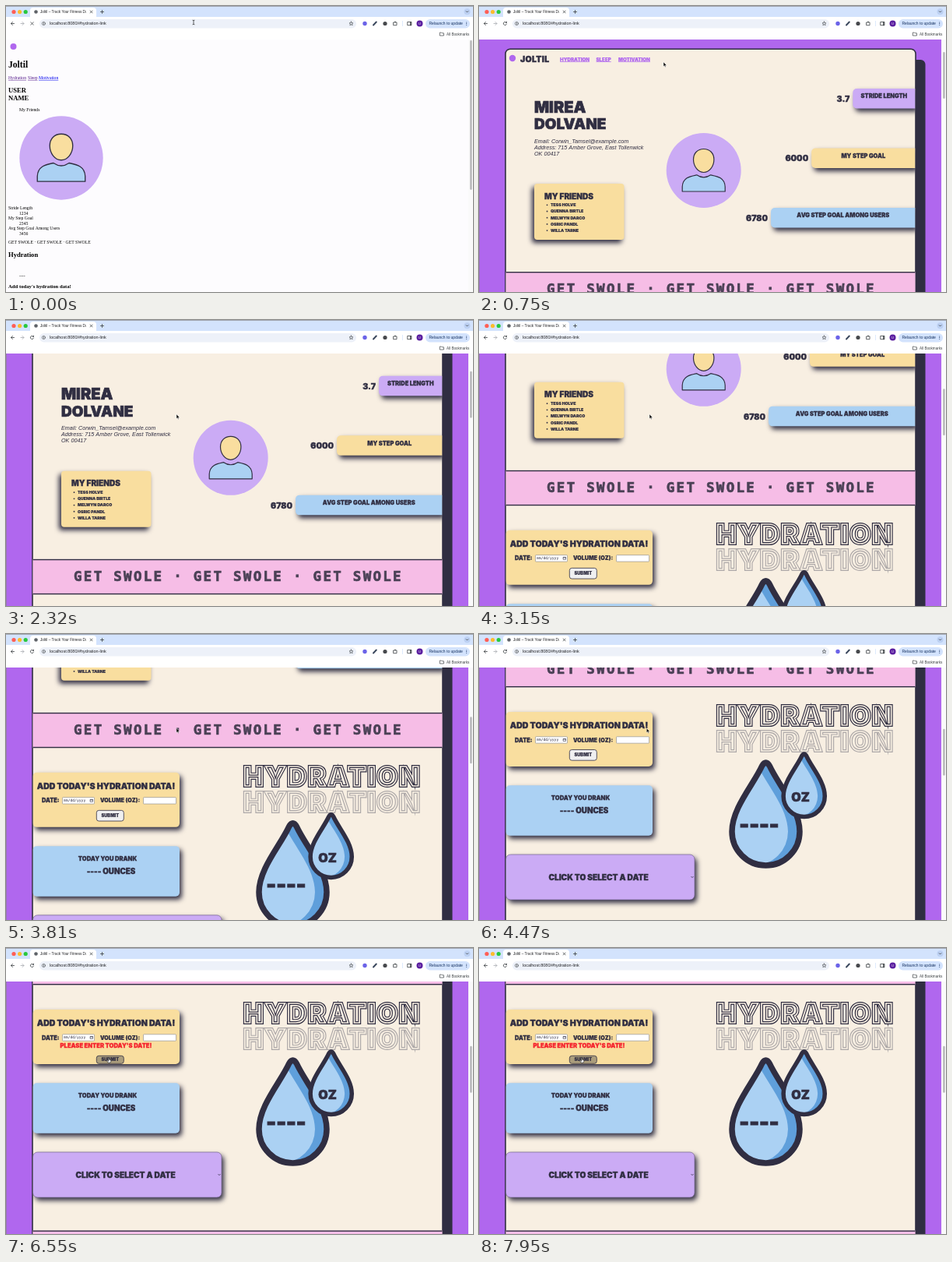
An HTML page with a canvas that plays this animation: 600x367 px, repeating every 8000 ms.

```html
<!DOCTYPE html>
<html lang="en">
<head>
<meta charset="utf-8">
<title>Joltil</title>
<style>
  html, body { margin: 0; width: 100%; height: 100%; overflow: hidden; }
  canvas { display: block; width: 600px; height: 367px; }
</style>
</head>
<body>
<canvas id="stage" width="600" height="367"></canvas>
<script>
const LOOP = 8000, STYLED_AT = 160, HOVER_AT = 6050, ERROR_AT = 6500;
const INK = '#302e42', CREAM = '#f8efe2', PURPLE = '#b067ee', LILAC = '#cbabf5',
      YELLOW = '#f9de9f', BLUE = '#abd1f3', DEEP = '#5f9fdb', PINK = '#f6bde6';
const SANS = '"Liberation Sans", Arial, sans-serif', SERIF = '"Liberation Serif", Times, serif',
      HEAVY = 'Inter, sans-serif', MONO = '"DejaVu Sans Mono", monospace';

const g = document.getElementById('stage').getContext('2d');

// Text placed by the middle of its capitals; weight thickens the letters, in em.
function text(str, x, y, size, { face = HEAVY, style = '900', color = INK, align = 'left',
                                 spacing = 0, line, weight = face === HEAVY ? 0.035 : 0 } = {}) {
  g.font = `${style} ${size}px ${face}`;
  g.textAlign = align;
  g.letterSpacing = spacing + 'px';
  g.fillStyle = g.strokeStyle = color;
  const base = y + size * 0.355;
  g.fillText(str, x, base);
  if (weight) {
    g.lineWidth = size * weight;
    g.lineJoin = 'miter';
    g.strokeText(str, x, base);
  }
  if (line) g.fillRect(x, y + size * 0.46, g.measureText(str).width, line);
}

function rect(x, y, w, h, color) {
  g.fillStyle = color;
  g.fillRect(x, y, w, h);
}

function box(x, y, w, h, r, color, { border, width = 0.8, shadow } = {}) {
  g.save();
  g.beginPath();
  g.roundRect(x, y, w, h, r);
  g.fillStyle = color;
  if (shadow) {
    g.shadowColor = INK;
    g.shadowBlur = 6.5;
    g.shadowOffsetX = shadow;
    g.shadowOffsetY = 4;
  }
  g.fill();
  g.restore();
  if (border) {
    g.strokeStyle = border;
    g.lineWidth = width;
    g.stroke();
  }
}

function disc(x, y, r, color) {
  g.beginPath();
  g.arc(x, y, r, 0, 7);
  g.fillStyle = color;
  g.fill();
}

function stroke(d, x, y, color = '#3c4043', width = 0.8, fill) {
  g.save();
  g.translate(x, y);
  const path = new Path2D(d);
  if (fill) {
    g.fillStyle = fill;
    g.fill(path);
  }
  g.strokeStyle = color;
  g.lineWidth = width;
  g.lineJoin = g.lineCap = 'round';
  g.stroke(path);
  g.restore();
}

// Interpolation through [time, ...values]; ease shapes each segment.
function track(keys, t, ease = p => p) {
  const i = keys.findIndex(k => k[0] > t);
  if (i < 0) return keys[keys.length - 1].slice(1);
  if (i === 0) return keys[0].slice(1);
  const a = keys[i - 1], b = keys[i], p = ease((t - a[0]) / (b[0] - a[0]));
  return a.slice(1).map((v, j) => v + (b[j + 1] - v) * p);
}
const smooth = p => p * p * (3 - 2 * p);

const SCROLL = [[2070, 0], [2320, 34], [2730, 98], [2880, 98], [3150, 148], [3310, 172],
                [3450, 172], [3810, 240], [4230, 305], [4360, 305], [4650, 339]];
const POINTER = [[80, 241, 21], [600, 237, 72], [1000, 237, 72], [1750, 219, 121],
                 [4400, 219, 121], [5050, 107, 121], [5400, 107, 121], [6200, 132, 141]];

function browser(t) {
  rect(0, 0, 600, 14, '#d3e3fd');
  rect(0, 14, 600, 29, '#fff');
  rect(0, 0, 600, 0.7, '#8b8b90');
  ['#ff5f57', '#febc2e', '#28c840'].forEach((c, i) => disc(10 + 7.6 * i, 7.5, 2.6, c));
  box(31, 2, 85, 13, [4, 4, 0, 0], '#fff');
  disc(38.5, 7.5, 2.3, '#5f6368');
  g.save();
  g.beginPath();
  g.rect(44, 0, 59, 14);
  g.clip();
  text('Joltil – Track Your Fitness Da', 44, 7.5, 4.7, { face: SANS, style: '', color: '#202124' });
  g.restore();
  stroke('M-1.4-1.4 1.4 1.4M1.4-1.4-1.4 1.4', 109.5, 7.5);
  stroke('M-2 0H2M0-2V2', 123.5, 7.5);
  disc(592.5, 7.3, 4, '#bcd0f2');
  stroke('M-1.3-.6 0 .7 1.3-.6', 592.5, 7.3);

  stroke('M2 0H-2M0-2-2 0 0 2', 8.5, 22.5);
  stroke('M-2 0H2M0-2 2 0 0 2', 21, 22.5, '#a8abb0');
  if (t < STYLED_AT) stroke('M-1.7-1.7 1.7 1.7M1.7-1.7-1.7 1.7', 33.5, 22.5);
  else stroke('M2 .6A2.1 2.1 0 1 1 1.5-1.5M2-2.3V-1H.7', 33.5, 22.5);
  box(43, 17, 407, 11.5, 5.7, '#edf1f9');
  stroke('M2.1 0A2.1 2.1 0 1 1-2.1 0A2.1 2.1 0 1 1 2.1 0M0-.2V1M0-1.1V-1', 48.5, 22.5, '#3c4043', 0.6);
  text('localhost:8080/#hydration-link', 56, 22.5, 5.5, { face: SANS, style: '', color: '#202124' });
  stroke('M0-2.5.7-.8 2.5-.7 1.1.5 1.6 2.3 0 1.3-1.6 2.3-1.1.5-2.5-.7-.7-.8Z', 443.5, 22.5, '#3c4043', 0.6);
  disc(461, 22.5, 2.7, '#6b63e8');
  stroke('M-2 2 1.8-2', 474, 22.5, '#39465c', 1.9);
  disc(487, 22.5, 2.6, '#46484c');
  stroke('M-2-1.5H2V2.2H-2ZM-.6-2.2H.7', 500, 22.5);
  rect(509, 19, 0.6, 7, '#c9dcfb');
  stroke('M-2.4-2H2.4V2.2H-2.4ZM1-2V2.2M1.7-2V2.2', 518.5, 22.5);
  disc(531.5, 22.5, 4, '#5b1fa0');
  text('U', 531.5, 22.5, 4, { face: SANS, style: '', color: '#fff', align: 'center' });
  box(539, 17, 57, 11.5, 5.7, '#d3e3fd');
  text('Relaunch to update', 543.5, 22.7, 5, { face: SANS, style: '', color: '#15315f' });
  for (let i = -1; i < 2; i++) disc(591.7, 22.6 + 1.7 * i, 0.5, '#15315f');
  stroke('M-2.3-1.9H-.5L.2-1.2H2.4V2H-2.3Z', 560, 36, '#3c4043', 0.7);
  text('All Bookmarks', 566, 36.2, 4.6, { face: SANS, style: '', color: '#3c4043' });
}

function scrollbar(y, h) {
  rect(594, 43, 6, 324, '#fafafa');
  box(596, y, 2.8, h, 1.4, '#bdbdbf');
}

function avatar(x, y, s) {
  g.save();
  g.translate(x, y);
  g.scale(s, s);
  disc(0, 0, 48, LILAC);
  stroke('M-27.5 27V21C-27 9-17 7.500-9 5.800Q0 12 9 5.800C17 7.500 27 9 27.500 21V27Z', 0, 0, INK, 1.2, BLUE);
  stroke('M0-27.5C8-27.5 13.200-22 13.200-14C13.200-5 7 2.500 0 2.500C-7 2.500-13.200-5-13.200-14C-13.200-22-8-27.500 0-27.500Z',
    0, 0, INK, 1.2, YELLOW);
  g.restore();
}

function plainPage() {
  rect(0, 43, 600, 324, '#fdfcfe');
  const plain = (str, x, y, size = 5.7, style = '', color = '#000', line) =>
    text(str, x, y, size, { face: SERIF, style, color, line });
  disc(9.5, 52, 4, PURPLE);
  plain('Joltil', 3, 74.5, 11.6, 'bold');
  plain('Hydration', 3, 92.3, 5.7, '', '#551a8b', 0.5);
  plain('Sleep', 28, 92.3, 5.7, '', '#551a8b', 0.5);
  plain('Motivation', 42, 92.3, 5.7, '', '#0000ee', 0.5);
  plain('USER', 3, 107.5, 8.6, 'bold');
  plain('NAME', 3, 117.5, 8.6, 'bold');
  plain('My Friends', 17, 132.7);
  avatar(71, 195, 1.118);
  [['Stride Length', '1234'], ['My Step Goal', '2345'], ['Avg Step Goal Among Users', '3456']]
    .forEach(([label, value], i) => {
      plain(label, 3, 259 + 13 * i);
      plain(value, 17, 265.5 + 13 * i);
    });
  plain('GET SWOLE · GET SWOLE · GET SWOLE', 3, 303.3);
  plain('Hydration', 3, 319, 8.6, 'bold');
  plain('----', 17, 346);
  plain("Add today's hydration data!", 3, 360, 6.7, 'bold');
  scrollbar(44, 192);
}

function stripe(y) {
  rect(34, y, 527, 45.3, PINK);
  rect(34, y, 527, 1.4, INK);
  rect(34, y + 44, 527, 1.4, INK);
  text('GET SWOLE · GET SWOLE · GET SWOLE', 87, y + 21.5, 17.5,
    { face: MONO, style: 'bold', color: '#4b4156', spacing: 2.28, weight: 0.04 });
}

function drop(x, y, s) {
  const path = new Path2D('M-5-84Q0-93 5-84C16-60 43.500-30 43.500 0A43.500 43.500 0 0 1-43.500 0C-43.500-30-16-60-5-84Z');
  g.save();
  g.translate(x, y);
  g.scale(s, s);
  g.save();
  g.clip(path);
  g.fillStyle = DEEP;
  g.fill(path);
  g.translate(-15, 0);
  g.fillStyle = BLUE;
  g.fill(path);
  g.restore();
  g.strokeStyle = INK;
  g.lineWidth = 2 + 5.5 / s ** 0.5;
  g.lineJoin = 'round';
  g.stroke(path);
  g.restore();
}

// Hollow letters with an outer and an inner contour.
function hollow(str, x, y, size, color) {
  g.font = `900 ${size}px ${HEAVY}`;
  g.textAlign = 'center';
  g.letterSpacing = '2.3px';
  g.lineJoin = 'miter';
  [[color, 4], [CREAM, 1.7]].forEach(([ink, width]) => {
    g.strokeStyle = ink;
    g.lineWidth = width;
    g.strokeText(str, x, y + size * 0.363);
  });
}

function profile(t) {
  disc(43, 67, 4.2, PURPLE);
  text('JOLTIL', 53, 68.3, 10.5, { spacing: 0.3 });
  [['HYDRATION', 104], ['SLEEP', 150.5], ['MOTIVATION', 179]].forEach(([label, x]) =>
    text(label, x, 68.5, 6.2, { color: PURPLE, line: 0.7 }));

  text('MIREA', 71, 129.5, 20);
  text('DOLVANE', 71, 151, 19);
  ['Email: Corwin_Tamsel@example.com', 'Address: 715 Amber Grove, East Tollenwick', 'OK 00417']
    .forEach((row, i) => text(row, 71, 173 + 8 * i, 7.2, { face: SANS, style: 'italic' }));

  box(71, 228, 115.5, 72, 4, YELLOW, { shadow: -3 });
  text('MY FRIENDS', 84, 244, 10.1);
  ['TESS HOLVE', 'QUENNA BIRTLE', 'MELWYN DARCO', 'OSRIC PANDL', 'WILLA TARNE'].forEach((name, i) => {
    disc(87.5, 255.3 + 8.2 * i, 0.9, INK);
    text(name, 92, 255.3 + 8.2 * i, 5.2);
  });

  avatar(288.7, 211, 1);

  const p = Math.min(1, (t - STYLED_AT) / 790), grown = 1 - (1 - p) ** 3;
  [['STRIDE LENGTH', '3.7', 81.5, LILAC], ['MY STEP GOAL', '6000', 135.5, YELLOW],
   ['AVG STEP GOAL AMONG USERS', '6780', 188.5, BLUE]].forEach(([label, value, full, color], i) => {
    const y = 106 + 76.5 * i, w = full * grown, x = 560.5 - w;
    box(x, y, w, 25.5, [5, 0, 0, 5], color, { shadow: 3 });
    text(value, x - 4, y + 13, 10.6, { align: 'right' });
    text(label, x + w / 2, y + 9.7, 7.5, { align: 'center' });
  });
}

function hydration(t) {
  const failed = t >= ERROR_AT;
  box(34.5, 418, 188.5, 70, 5, YELLOW, { shadow: 3 });
  text("ADD TODAY'S HYDRATION DATA!", 128.5, 435.7, 10.6, { align: 'center' });
  text('DATE:', 46, 454, 7.4);
  text('VOLUME (OZ):', 121, 454, 7.1);
  box(72.5, 449.8, 41, 8.4, 0.8, '#fff', { border: '#85858a', width: 0.6 });
  text('mm/dd/yyyy', 74, 453.6, 4.7, { face: MONO, style: '' });
  stroke('M-1.5-1.3H1.5V1.6H-1.5ZM-1.5-.7H1.5', 110, 453.8, INK, 0.6);
  box(176.5, 449.8, 42, 8.4, 0.8, '#fff', { border: '#85858a', width: 0.6 });
  if (failed) text("PLEASE ENTER TODAY'S DATE!", 128.5, 464.3, 7.6, { color: '#f5222d', align: 'center' });
  const top = failed ? 477.3 : 466.5, h = failed ? 10 : 13.7;
  box(116.3, top, 35, h, 3, t >= HOVER_AT ? '#ab9d7c' : '#efeff0', { border: INK });
  text('SUBMIT', 133.8, top + h / 2, 5.7, { align: 'center' });

  box(34.5, 512.3, 188.5, 64.5, 5, BLUE, { shadow: 3 });
  text('TODAY YOU DRANK', 130.5, 528.6, 7.6, { align: 'center' });
  text('---- OUNCES', 135, 545, 9.8, { align: 'center' });

  box(34.5, 601, 242.5, 58, 6, LILAC, { shadow: 3, border: '#75658f', width: 0.7 });
  text('CLICK TO SELECT A DATE', 153.5, 630, 10.1, { align: 'center' });
  stroke('M-1.2-.6 0 .6 1.2-.6', 274, 630, INK, 0.8);

  hollow('HYDRATION', 419.5, 422.5, 33.8, INK);
  hollow('HYDRATION', 419.5, 456, 33.8, '#ada8a8');

  drop(368.5, 571.5, 1);
  text('----', 360, 562, 27, { align: 'center' });
  drop(417.7, 526, 0.611);
  text('OZ', 413, 527.5, 16, { align: 'center' });
}

function styledPage(t) {
  const [scroll] = track(SCROLL, t);
  g.save();
  g.beginPath();
  g.rect(0, 43, 594, 324);
  g.clip();
  rect(0, 43, 594, 324, PURPLE);
  rect(0, 43, 0.7, 324, '#8d7d9c');
  g.translate(0, -scroll);
  box(548, 69, 25.5, 800, 6, INK);
  box(34, 55.3, 527, 800, 6, CREAM, { border: INK, width: 1.6 });
  g.save();
  g.beginPath();
  g.rect(34.5, 56, 526, 800);
  g.clip();
  profile(t);
  hydration(t);
  stripe(341);
  stripe(701.5);
  g.restore();
  g.restore();
  scrollbar(59 + scroll * 0.197, 60);
}

function pointer(t) {
  const [x, y] = track(POINTER, t, smooth);
  if (y < 30) stroke('M-1-2.8Q0-2.8 0-2Q0-2.8 1-2.8M0-2V2M-1 2.8Q0 2.8 0 2Q0 2.8 1 2.8', x, y, '#222', 0.7);
  else if (t >= HOVER_AT) stroke('M-.6 0Q0-.7.6 0V2.2L2.8 2.8V4.6L2 6.2H-.8L-2.5 3.6-1.8 3-.6 4Z', x, y, '#111', 0.6, '#fff');
  else stroke('M0 0V5.6L1.3 4.5 2.2 6.5 3.1 6.1 2.2 4.2H4Z', x, y, '#fff', 0.5, '#000');
}

const start = performance.now();
function frame() {
  const t = (performance.now() - start) % LOOP;
  if (t < STYLED_AT) plainPage();
  else styledPage(t);
  browser(t);
  pointer(t);
  requestAnimationFrame(frame);
}
frame();
</script>
</body>
</html>
```
